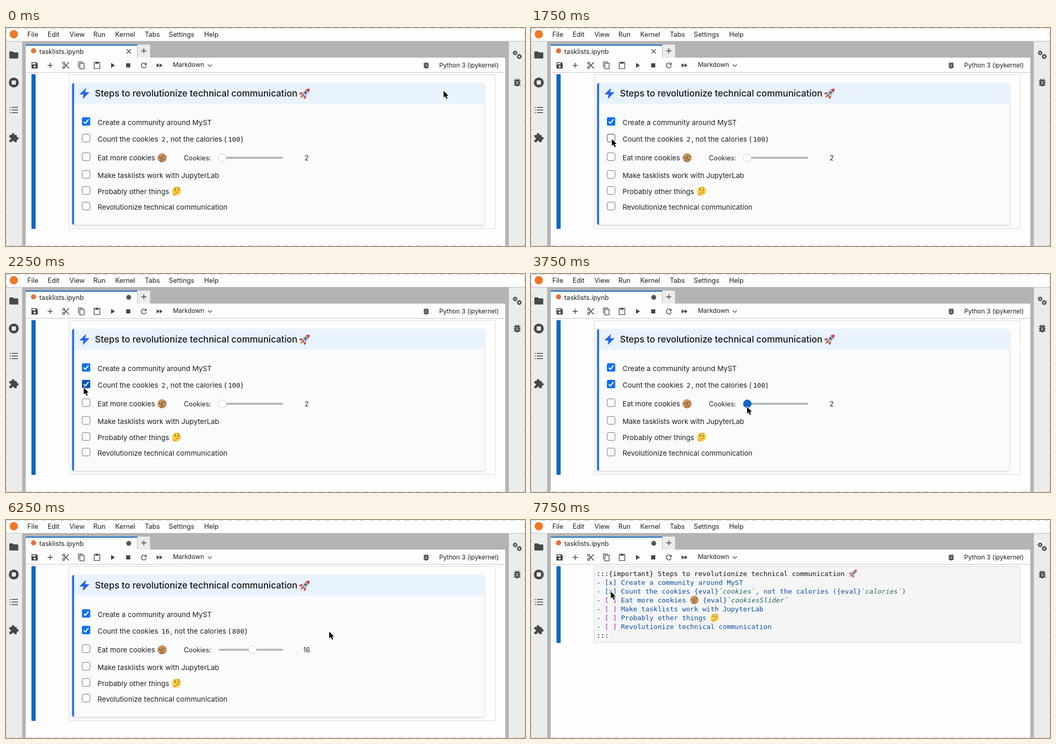
Recreate the animation shown at these times as an HTML page with a canvas. Size 998 px wide and 420 px high, loop 8000 ms.

```html
<!DOCTYPE html>
<html lang="en">
<head>
<meta charset="utf-8">
<title>Task list notebook</title>
<style>
  html, body { margin: 0; width: 100%; height: 100%; overflow: hidden; background: #fdfdfd; }
  canvas { display: block; }
</style>
</head>
<body>
<canvas id="stage" width="998" height="420"></canvas>
<script>
const ctx = document.getElementById('stage').getContext('2d');
const LOOP = 8000, STEP = 250;
const UI = 'Inter, "Open Sans", sans-serif';
const MONO = '13px "DejaVu Sans Mono", "Liberation Mono", monospace';
const MONO_W = 7.83;
const INK = '#1f1f1f', ICON = '#484848', BLUE = '#1068c4', SIDE = '#ececec';

// Drawing helpers
function rect(x, y, w, h, color) {
  ctx.fillStyle = color;
  ctx.fillRect(x, y, w, h);
}
function round(x, y, w, h, r, fill, line) {
  ctx.beginPath();
  ctx.roundRect(x, y, w, h, r);
  if (fill) { ctx.fillStyle = fill; ctx.fill(); }
  if (line) { ctx.strokeStyle = line; ctx.lineWidth = 1; ctx.stroke(); }
}
function disc(x, y, r, fill, line) {
  ctx.beginPath();
  ctx.arc(x, y, r, 0, Math.PI * 2);
  if (fill) { ctx.fillStyle = fill; ctx.fill(); }
  if (line) { ctx.strokeStyle = line; ctx.lineWidth = 1; ctx.stroke(); }
}
function fill(d, color) {
  ctx.fillStyle = color;
  ctx.fill(new Path2D(d), 'evenodd');
}
function line(d, color, width) {
  ctx.strokeStyle = color;
  ctx.lineWidth = width;
  ctx.stroke(new Path2D(d));
}
function text(s, x, y, font, color = INK, align = 'left') {
  ctx.font = font;
  ctx.fillStyle = color;
  ctx.textAlign = align;
  ctx.fillText(s, x, y);
}
function at(x, y, scale, draw, angle = 0) {
  ctx.save();
  ctx.translate(x, y);
  ctx.rotate(angle);
  ctx.scale(scale, scale);
  draw();
  ctx.restore();
}

// Icons, each centred on 0,0
const icons = {
  save() {
    fill('M-6 -6H3.5L6 -3.5V6H-6ZM-4.6 -4.6V-2H2V-4.6Z', ICON);
    disc(0, 2.2, 2, '#fdfdfd');
  },
  plus() { line('M-5 0H5M0 -5V5', ICON, 1.4); },
  cut() {
    line('M-3 -3L6 6M-3 3L6 -6', ICON, 1.6);
    for (const y of [-4, 4]) line(`M-6 ${y}a2 2 0 1 0 4 0a2 2 0 1 0 -4 0`, ICON, 1.3);
  },
  copy() { line('M-5.7 4V-6.6H3M-3 -4H5.2V6.6H-3Z', ICON, 1.3); },
  paste() {
    line('M-5.4 -5.8H5.4V6.2H-5.4Z', ICON, 1.3);
    fill('M-3.3 -6H-1.8A2 2 0 0 1 1.8 -6H3.3V-3.2H-3.3Z', ICON);
  },
  run() { fill('M-3 -4.8L4.6 0L-3 4.8Z', ICON); },
  stop() { rect(-4, -4, 8, 8, ICON); },
  restart() {
    line('M4.8 1A4.8 4.8 0 1 1 3.2 -3.5', ICON, 1.4);
    fill('M5.4 -5.6V-.8H.6Z', ICON);
  },
  runAll() { fill('M-5.4 -4L.2 0L-5.4 4ZM.4 -4L6 0L.4 4Z', ICON); },
  bug() {
    line('M-5.3 -3H5.3M-5.3 .4H5.3M-5.3 3.8H5.3M-3 -5.8L-1 -3.8M3 -5.8L1 -3.8', ICON, 1.3);
    round(-3.9, -4.6, 7.8, 10.6, 3.9, ICON);
    rect(-1.4, -1.4, 2.8, 1.3, '#f4f4f4');
    rect(-1.4, 1.3, 2.8, 1.3, '#f4f4f4');
  },
  folder() { fill('M-8.6 -5.4Q-8.6 -7 -7 -7H-2L0 -5H7Q8.6 -5 8.6 -3.4V5.2Q8.6 6.8 7 6.8H-7Q-8.6 6.8 -8.6 5.2Z', ICON); },
  kernels() {
    disc(0, 0, 9.6, ICON);
    round(-4, -4, 8, 8, 1, SIDE);
  },
  outline() {
    for (const y of [-5, 0, 5]) {
      rect(-8, y - .7, 2, 1.5, ICON);
      rect(-4, y - .7, 12, 1.5, ICON);
    }
  },
  puzzle() {
    round(-8.6, -5, 14.4, 14, 1.6, ICON);
    disc(-1.4, -6, 2.6, ICON);
    disc(6.6, 1.6, 2.6, ICON);
    disc(-8, 2.2, 2.4, SIDE);
    disc(-1.4, 8.6, 2.4, SIDE);
  },
  gear() {
    for (let i = 0; i < 4; i++) {
      ctx.rotate(Math.PI / 4);
      rect(-1.2, -5.6, 2.4, 11.2, ICON);
    }
    disc(0, 0, 4.3, ICON);
    disc(0, 0, 2, SIDE);
  }
};
const icon = (name, x, y, scale = 1) => at(x, y, scale, icons[name]);

// Emoji in a box of about 20 units
const emoji = {
  rocket() {
    ctx.rotate(Math.PI / 4);
    fill('M-2 6L0 12L2 6Z', '#f59a23');
    fill('M-2.6 0L-6.6 4V8L-2 5ZM2.6 0L6.6 4V8L2 5Z', '#d23b3d');
    fill('M0 -12Q7 -4 2.8 6.5H-2.8Q-7 -4 0 -12Z', '#b9c4cc');
    fill('M0 -12Q3 -9 3.7 -6H-3.7Q-3 -9 0 -12Z', '#d23b3d');
    disc(0, -2, 2, '#35587a');
    fill('M-.8 2H.8V8H-.8Z', '#b32d30');
  },
  cookie() {
    disc(0, 0, 9.6, '#a8693a');
    disc(-.4, -.6, 8.6, '#cf9a62');
    for (let i = 0; i < 7; i++) {
      const a = i * 2.4, r = 2.6 * Math.sqrt(i);
      disc(r * Math.cos(a), r * Math.sin(a), 1.3, '#6b3d22');
    }
  },
  thinking() {
    disc(0, 0, 9.6, '#fccf45');
    disc(-3, -2.4, 1.3, '#5b3a12');
    disc(4, -2.4, 1.3, '#5b3a12');
    line('M-5 -5.4Q-3 -6.6 -1 -5.4M2 -7Q5 -8.4 7 -6M-1 3Q2 1.6 4.6 2.6', '#7a4f18', 1);
    fill('M-8 4Q-7 3 -6 5.4L1 4.4Q3 5 1 6L-1.5 6.6Q-1 10 -5 10Q-9 9 -8 4Z', '#f0ac34');
  }
};
const mood = (name, x, y, size) => at(x, y, size / 20, emoji[name]);

// Time
const CHECKED = 2000, GRAB = 3750, RELEASE = 5500, EDIT = 6500;
const ease = p => (1 - Math.cos(Math.PI * p)) / 2;
const pointer = [
  [0, 841, 121], [1250, 180, 209], [1750, 155, 214], [2000, 153, 216], [2250, 149, 219],
  [2750, 149, 219], [3250, 285, 260], [3750, 415, 256], [4000, 415, 256],
  [5000, 472, 256], [5250, 472, 256], [6250, 621, 215], [6750, 621, 215], [7750, 153, 138]
];
function pointerAt(t) {
  const i = pointer.findIndex(k => k[0] > t);
  if (i < 0) return pointer[pointer.length - 1].slice(1);
  const [t0, x0, y0] = pointer[i - 1], [t1, x1, y1] = pointer[i];
  const p = ease((t - t0) / (t1 - t0));
  return [x0 + (x1 - x0) * p, y0 + (y1 - y0) * p];
}
const slideAt = t => ease(Math.min(1, Math.max(0, (t - 4000) / 1000)));

// Scene
function drawShell(dirty) {
  rect(0, 0, 998, 420, '#fdfdfd');
  rect(0, 25, 998, 395, SIDE);
  rect(31, 25, 936, 395, '#b4b4b4');
  rect(0, 25, 998, 1, '#bdbdbd');
  rect(38, 57, 922, 363, '#fdfdfd');
  rect(38, 85, 922, 1, '#c6c6c6');

  disc(15, 12, 8, '#f37726');
  const menu = { File: 41, Edit: 80, View: 122, Run: 168, Kernel: 210, Tabs: 267, Settings: 313, Help: 381 };
  for (const name in menu) text(name, menu[name], 17, `12.7px ${UI}`);

  rect(38, 32, 214, 26, '#fdfdfd');
  rect(38, 32, 214, 2, BLUE);
  disc(53, 44, 5, '#e8703a');
  text('tasklists.ipynb', 64, 50, `12.75px ${UI}`);
  if (dirty) disc(236, 45, 4.7, '#555');
  else line('M232 41L240 49M240 41L232 49', '#444', 1.4);
  rect(253, 32, 24, 25, SIDE);
  icon('plus', 265, 44);

  ['save', 'plus', 'cut', 'copy', 'paste', 'run', 'stop', 'restart', 'runAll']
    .forEach((name, i) => icon(name, 55 + 30 * i, 72));
  text('Markdown', 321, 75, `12px ${UI}`);
  line('M388 70L392 74L396 70', '#555', 1.4);
  icon('bug', 808, 72);
  text('Python 3 (ipykernel)', 833, 76, `12px ${UI}`);

  ['folder', 'kernels', 'outline', 'puzzle'].forEach((name, i) => icon(name, 15, 52 + 53 * i));
  icon('gear', 979, 48, .8);
  icon('gear', 987, 55, .85);
  icon('bug', 983, 105, 1.25);
}

function drawBorder() {
  ctx.save();
  ctx.setLineDash([10, 7]);
  ctx.strokeStyle = '#c2c2c2';
  ctx.lineWidth = 1;
  ctx.strokeRect(.5, .5, 997, 419);
  ctx.restore();
}

function drawCell(height, color) {
  round(49, 89, 8, height + 1, 1, BLUE);
  round(121.5, 89.5, 819, height, 0, color, '#dadada');
}

function checkbox(y, checked, hover) {
  if (!checked) return round(146.5, y - 7.5, 15, 15, 2.5, '#fff', hover ? '#4a4a4a' : '#767676');
  round(146, y - 8, 16, 16, 2.5, hover ? '#0a54b4' : '#0a70f5');
  line(`M149.5 ${y + .5}L152.7 ${y + 3.7}L158.6 ${y - 4}`, '#fff', 2.1);
}

function drawPanel() {
  ctx.save();
  ctx.shadowColor = 'rgba(0,0,0,.18)';
  ctx.shadowBlur = 4;
  ctx.shadowOffsetY = 1.5;
  round(127, 106, 793, 273, 4, '#fafbfc');
  ctx.restore();
  ctx.save();
  ctx.beginPath();
  ctx.roundRect(127, 106, 793, 273, 4);
  ctx.clip();
  rect(127, 106, 793, 40, '#e9f3fe');
  rect(127, 106, 4, 273, '#2f74e6');
  ctx.restore();
  fill('M154 115.5L141 128H149L147.5 137L160.5 123.8H152.3Z', '#2563eb');
  text('Steps to revolutionize technical communication', 171, 132, `500 17.25px ${UI}`, '#161616');
  mood('rocket', 574.5, 126, 22);
}

function drawRendered(t) {
  const slide = slideAt(t), cookies = Math.round(2 + 14 * slide);
  const body = `13.6px ${UI}`;
  drawCell(297);
  drawPanel();

  checkbox(180, true);
  checkbox(212, t >= CHECKED, t >= 1500 && t < 3000);
  for (const y of [248, 282, 313, 343]) checkbox(y, false);

  text('Create a community around MyST', 176, 187, body);
  const count = String(cookies), shift = MONO_W * (count.length - 1);
  const calories = String(cookies * 50);
  text('Count the cookies', 176, 219, body);
  text(count, 299, 219, MONO);
  text(', not the calories (', 308.5 + shift, 219, body);
  text(calories, 427 + shift, 219, MONO);
  text(')', 428 + shift + MONO_W * calories.length, 219, body);

  text('Eat more cookies', 176, 255, body);
  mood('cookie', 300, 250, 18);
  text('Cookies:', 342, 255, `12.7px ${UI}`);
  round(409, 248, 124, 4, 2, '#b9b9b9');
  const active = t >= GRAB && t < RELEASE;
  disc(416 + 58 * slide, 250, 7.6, active ? BLUE : '#fff', active ? BLUE : '#cfcfcf');
  text(count, 578, 255, `12.7px ${UI}`, INK, 'center');

  text('Make tasklists work with JupyterLab', 176, 289, body);
  text('Probably other things', 176, 320, body);
  mood('thinking', 328, 314, 18);
  text('Revolutionize technical communication', 176, 350, body);
}

const TONE = { ink: '#161616', blue: '#0a50a4', violet: '#a028e0', teal: '#286a66' };
function row(n, ...parts) {
  let x = 126;
  const y = 108 + 17 * n;
  for (const [tone, s] of parts) {
    if (tone === 'emoji') {
      mood(s, x + 8, y - 5, 16.5);
      x += 16.3;
    } else {
      text(s, x, y, (tone === 'teal' ? 'italic ' : '') + MONO, TONE[tone]);
      x += MONO_W * s.length;
    }
  }
}
function drawSource() {
  const blue = s => ['blue', s], code = s => ['teal', '`' + s + '`'];
  const open = [blue('- '), ['violet', '[ ]']];
  drawCell(147, '#f5f5f5');
  row(0, ['ink', ':::{important} Steps to revolutionize technical communication '], ['emoji', 'rocket']);
  row(1, blue('- [x] Create a community around MyST'));
  row(2, blue('- [x] Count the cookies {eval}'), code('cookies'),
    blue(', not the calories ({eval}'), code('calories'), blue(')'));
  row(3, ...open, blue(' Eat more cookies '), ['emoji', 'cookie'], blue(' {eval}'), code('cookiesSlider'));
  row(4, ...open, blue(' Make tasklists work with JupyterLab'));
  row(5, ...open, blue(' Probably other things '), ['emoji', 'thinking']);
  row(6, ...open, blue(' Revolutionize technical communication'));
  row(7, ['ink', ':::']);
}

function drawPointer(x, y) {
  at(x, y, 1, () => {
    const arrow = 'M.5 0V13L3.5 10.2L5.8 15.4L8 14.4L5.7 9.4H9.8Z';
    ctx.lineJoin = 'round';
    line(arrow, '#fff', 2);
    fill(arrow, '#000');
  });
}

function tick(now) {
  const t = Math.floor((now % LOOP) / STEP) * STEP;
  drawShell(t >= CHECKED);
  if (t < EDIT) drawRendered(t);
  else drawSource();
  drawBorder();
  drawPointer(...pointerAt(t));
  requestAnimationFrame(tick);
}
requestAnimationFrame(tick);
</script>
</body>
</html>
```
